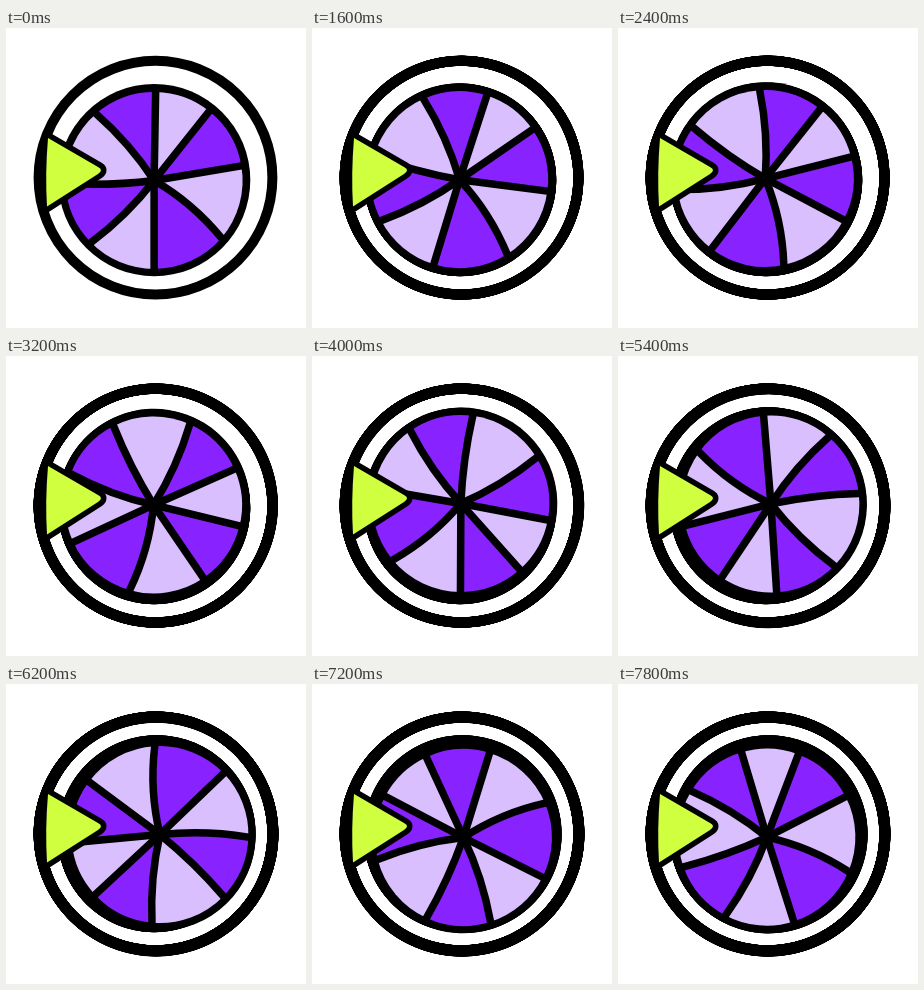
Animation, 300 px wide and 300 px high, one loop 8 s. Source, as an HTML page with a canvas:

```html
<!DOCTYPE html>
<html lang="en">
<head>
<meta charset="utf-8">
<title>Spinning wheel</title>
<style>
html, body { margin: 0; width: 100%; height: 100%; overflow: hidden; background: #fff; }
canvas { display: block; width: 300px; height: 300px; }
</style>
</head>
<body>
<canvas id="stage" width="300" height="300"></canvas>
<script>
const ctx = document.getElementById('stage').getContext('2d');
const STEP = 200, STEPS = 40;
const RAD = Math.PI / 180;
const PIVOT = [150.6, 150.3];
const HUB = [-2.5, 2.2];
const RADIUS = 88.5;
const LIGHT = '#dabfff', PURPLE = '#8822ff', LIME = '#d0ff40';

// Divider angle (clockwise from the top) and sideways bend in pixels.
const dividers = [
  [1, 0], [38.5, 0], [80.5, 0], [130.5, -4],
  [180, 0], [225.5, -3], [268, -2], [319, 3]
];

// The early part of a long ease-in-out spin.
const angleAt = n => (0.275 * n * n - 0.00128 * n ** 3) * RAD;

function turned([px, py], angle, draw) {
  ctx.save();
  ctx.translate(px, py);
  ctx.rotate(angle);
  draw();
  ctx.restore();
}

function disc(x, y, r) {
  ctx.beginPath();
  ctx.arc(x, y, r, 0, 2 * Math.PI);
}

// Dark outlines stay behind as the off-centre wheel turns.
function drawTrail(n) {
  for (let k = 0; k <= n; k++) {
    turned(PIVOT, angleAt(k), () => {
      disc(-2.4, 1.8, 96.1);
      ctx.fill();
    });
    turned([150, 150], angleAt(k), () => {
      disc(-0.5, -0.3, 116.9);
      ctx.lineWidth = 10;
      ctx.stroke();
    });
  }
}

function spoke([deg, bend]) {
  const a = (deg - 90) * RAD, c = Math.cos(a), s = Math.sin(a);
  return {
    a,
    mid: [c * RADIUS / 2 - s * bend * 2, s * RADIUS / 2 + c * bend * 2],
    end: [c * RADIUS, s * RADIUS]
  };
}
const spokes = dividers.map(spoke);

function drawWheel() {
  ctx.translate(...HUB);
  spokes.forEach((from, i) => {
    const to = spokes[(i + 1) % spokes.length];
    ctx.beginPath();
    ctx.moveTo(0, 0);
    ctx.quadraticCurveTo(...from.mid, ...from.end);
    ctx.arc(0, 0, RADIUS, from.a, to.a);
    ctx.quadraticCurveTo(...to.mid, 0, 0);
    ctx.fillStyle = i % 2 ? PURPLE : LIGHT;
    ctx.fill();
  });
  ctx.lineWidth = 7.5;
  for (const { mid, end } of spokes) {
    ctx.beginPath();
    ctx.moveTo(0, 0);
    ctx.quadraticCurveTo(...mid, ...end);
    ctx.stroke();
  }
}

function drawPointer() {
  ctx.beginPath();
  ctx.moveTo(42, 110);
  ctx.lineTo(92, 139);
  ctx.quadraticCurveTo(98, 142, 92, 146);
  ctx.lineTo(41, 178.5);
  ctx.quadraticCurveTo(39, 146, 42, 110);
  ctx.closePath();
  ctx.lineWidth = 11;
  ctx.stroke();
  ctx.fillStyle = LIME;
  ctx.fill();
}

function render(now) {
  const n = Math.floor(now / STEP) % STEPS;
  ctx.fillStyle = '#fff';
  ctx.fillRect(0, 0, 300, 300);
  ctx.fillStyle = ctx.strokeStyle = '#000';
  ctx.lineCap = ctx.lineJoin = 'round';
  drawTrail(n);
  turned(PIVOT, angleAt(n), drawWheel);
  drawPointer();
}

let start;
function tick(now) {
  start ??= now;
  render(Math.max(0, now - start));
  requestAnimationFrame(tick);
}
render(0);
requestAnimationFrame(tick);
</script>
</body>
</html>
```
